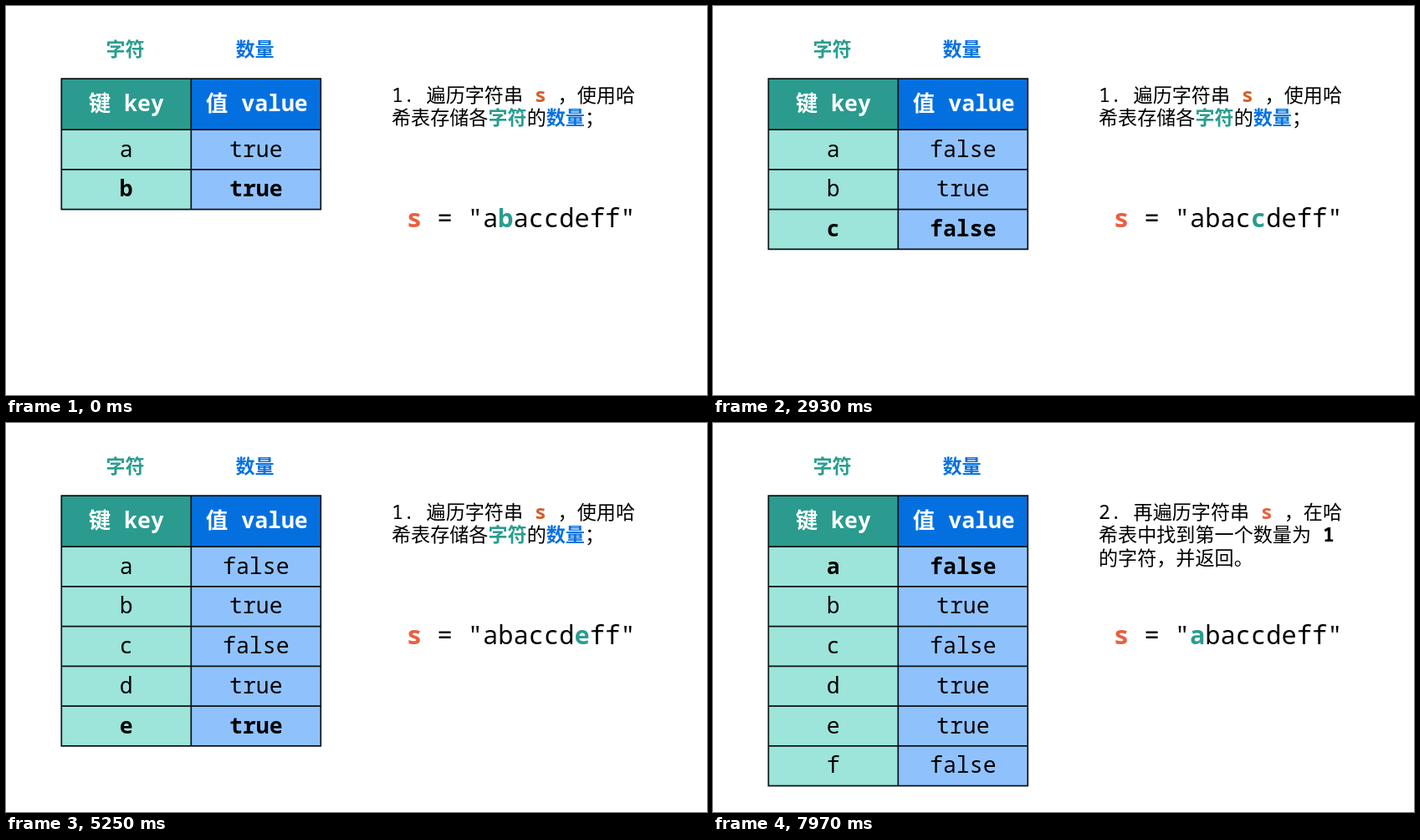
An HTML page that plays this animation: 838 px wide and 466 px high, repeating every 8000 ms.

```html
<!DOCTYPE html>
<html lang="zh-CN">
<head>
<meta charset="utf-8">
<style>
  html, body { margin: 0; width: 100%; height: 100%; overflow: hidden; background: #fff; }
  svg { display: block; width: 838px; height: 466px; }
  text {
    font-family: "Noto Sans Mono", "Noto Sans CJK SC", "Noto Sans CJK", monospace;
    white-space: pre;
    font-variant-ligatures: none;
  }
  .mid { text-anchor: middle; }
  .label, .note { font-size: 23.1px; }
  .cell { font-size: 26.5px; }
  .word { font-size: 30.4px; }
  .b { font-weight: 700; }
  .teal { fill: #2a9d8f; }
  .blue { fill: #0672e0; }
  .rust { fill: #d4602c; }
  .red { fill: #e8603f; }
  .white { fill: #fff; }
  .grid { fill: none; stroke: #0b1216; stroke-width: 1.7; }
</style>
</head>
<body>
<svg viewBox="0 0 838 466">
  <rect width="838" height="466" fill="#fff"/>
  <text class="label mid b teal" x="142.5" y="60.2">字符</text>
  <text class="label mid b blue" x="297.5" y="60.2">数量</text>
  <g id="table"></g>
  <g id="note"></g>
  <text id="word" class="word" x="478.9" y="265"></text>
</svg>
<script>
const WORD = "abaccdeff";
const LOOP = 8000;
// Start time of each step; the last one begins the second pass.
const STARTS = [0, 850, 1830, 2850, 3860, 4840, 5860, 6870, 7810];
const LEFT = 66.3, COL = 155, TOP = 87.2, HEAD = 61, ROW = 47.75;

const el = id => document.getElementById(id);
const span = (cls, s) => `<tspan class="${cls}">${s}</tspan>`;
const text = (cls, x, y, s) => `<text class="${cls}" x="${x}" y="${y}">${s}</text>`;
const rect = (x, y, w, h, fill) =>
  `<rect x="${x}" y="${y}" width="${w}" height="${h}" fill="${fill}"/>`;

const NOTES = [
  [
    `1. 遍历字符串 ${span("b rust", "s")} ，使用哈`,
    `希表存储各${span("b teal", "字符")}的${span("b blue", "数量")}；`
  ],
  [
    `2. 再遍历字符串 ${span("b red", "s")} ，在哈`,
    `希表中找到第一个数量为 ${span("b", "1")}`,
    "的字符，并返回。"
  ]
];

function tableMarkup(read, current) {
  const keys = [...new Set(read)];
  const bodyTop = TOP + HEAD, bodyH = keys.length * ROW;
  const bottom = bodyTop + bodyH, right = LEFT + 2 * COL;
  const x1 = LEFT + COL / 2, x2 = x1 + COL;

  let out = rect(LEFT, TOP, COL, HEAD, "#2a9b8e")
    + rect(LEFT + COL, TOP, COL, HEAD, "#0470e0")
    + rect(LEFT, bodyTop, COL, bodyH, "#9de4da")
    + rect(LEFT + COL, bodyTop, COL, bodyH, "#8fc2fd")
    + text("cell mid b white", x1, 126, "键 key")
    + text("cell mid b white", x2 + 1, 126, "值 value");

  let lines = `M${LEFT} ${TOP}H${right}V${bottom}H${LEFT}ZM${LEFT + COL} ${TOP}V${bottom}`;
  keys.forEach((key, i) => {
    const y = bodyTop + i * ROW;
    const cls = "cell mid" + (key === current ? " b" : "");
    const single = read.indexOf(key) === read.lastIndexOf(key);
    lines += `M${LEFT} ${y}H${right}`;
    out += text(cls, x1, y + 32.3, key) + text(cls, x2, y + 32.3, single);
  });
  return out + `<path class="grid" d="${lines}"/>`;
}

function show(step) {
  const second = step === STARTS.length - 1;
  const at = second ? 0 : step + 1;
  const read = second ? WORD : WORD.slice(0, at + 1);

  el("table").innerHTML = tableMarkup(read, WORD[at]);
  el("note").innerHTML = NOTES[+second]
    .map((line, i) => text("note", 461, 114.5 + i * 27.7, line)).join("");
  el("word").innerHTML = span("b red", "s") + ' = "' + WORD.slice(0, at)
    + span("b teal", WORD[at]) + WORD.slice(at + 1) + '"';
}

let shown = -1;
function tick() {
  const t = performance.now() % LOOP;
  const step = STARTS.filter(s => s <= t).length - 1;
  if (step !== shown) show(shown = step);
  requestAnimationFrame(tick);
}
tick();
</script>
</body>
</html>
```
